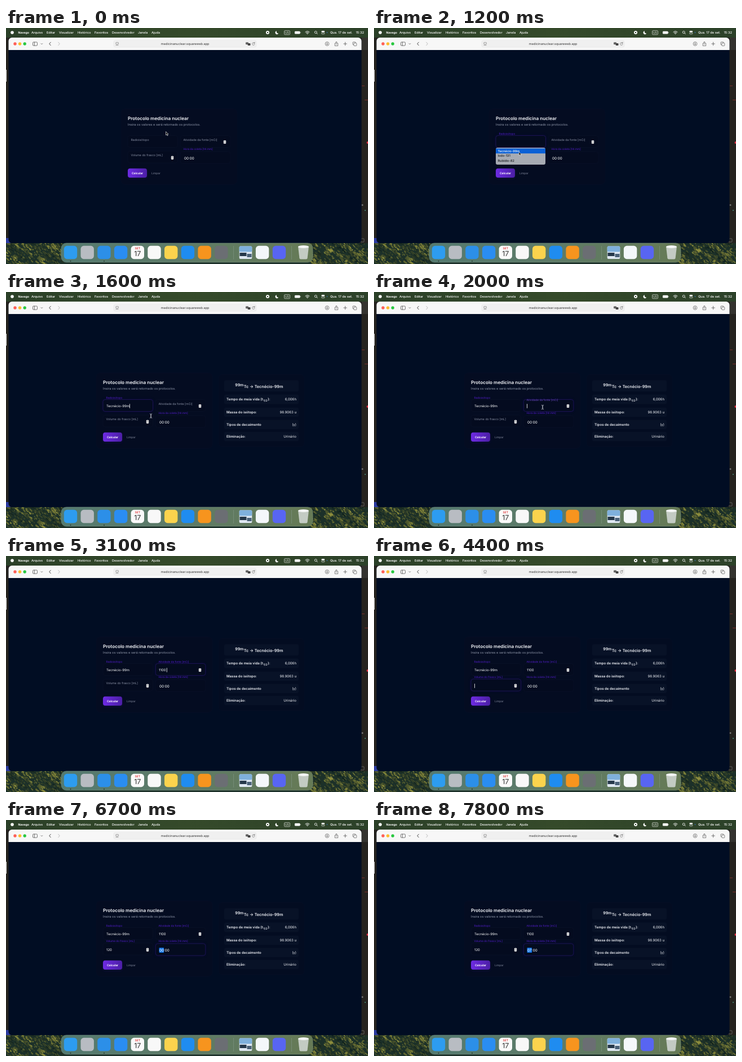
An HTML page for the animation above (8000 ms loop, 642 by 418 pixels).

```html
<!DOCTYPE html>
<html lang="pt-BR">
<head>
<meta charset="utf-8">
<title>Protocolo medicina nuclear</title>
<style>
  html, body { margin: 0; width: 100%; height: 100%; overflow: hidden; background: #1d2a1c; }
  svg { display: block; width: 642px; height: 418px; }
  text { font-family: Inter, Roboto, sans-serif; white-space: pre; text-rendering: geometricPrecision; }
</style>
</head>
<body>
<svg viewBox="0 0 642 418">
  <defs>
    <linearGradient id="button"><stop stop-color="#6d2be2"/><stop offset="1" stop-color="#4c1fa6"/></linearGradient>
    <linearGradient id="menubar"><stop stop-color="#2b4028"/><stop offset=".5" stop-color="#354a2a"/><stop offset="1" stop-color="#2c4129"/></linearGradient>
    <linearGradient id="dock"><stop stop-color="#547a70"/><stop offset=".5" stop-color="#5e7b67"/><stop offset="1" stop-color="#667a55"/></linearGradient>
    <filter id="glow" x="-20%" y="-50%" width="140%" height="200%"><feGaussianBlur stdDeviation="2"/></filter>
  </defs>
  <g id="desktop"></g>
  <g id="page"></g>
</svg>
<script>
const LOOP = 8000, STEP = 100;
const byId = id => document.getElementById(id);

// Drawing helpers; text is placed by its vertical centre.
const rect = (x, y, w, h, fill, r = 0, more = '') =>
  `<rect x="${x}" y="${y}" width="${w}" height="${h}" rx="${r}" fill="${fill}" ${more}/>`;
const circle = (x, y, r, fill, more = '') => `<circle cx="${x}" cy="${y}" r="${r}" fill="${fill}" ${more}/>`;
const line = (d, color = '#555', width = .8) =>
  `<path d="${d}" fill="none" stroke="${color}" stroke-width="${width}" stroke-linecap="round" stroke-linejoin="round"/>`;
const text = (x, y, str, size, fill = '#fff', weight = 400, anchor = 'start') =>
  `<text x="${x}" y="${y + size * .36}" font-size="${size}" fill="${fill}" font-weight="${weight}" text-anchor="${anchor}">${str}</text>`;

const easeOut = (t, start, span) => {
  const p = Math.min(1, Math.max(0, (t - start) / span));
  return 1 - (1 - p) ** 2;
};
const mix = (a, b, p) => a + (b - a) * p;
const mixColor = (a, b, p) => `rgb(${a.map((v, i) => Math.round(mix(v, b[i], p)))})`;

// Wooded slopes: short diagonal strokes, lit in broad bands.
function wallpaper() {
  let seed = 7;
  const random = () => (seed = seed * 16807 % 2147483647) / 2147483647;
  let out = rect(0, 378, 642, 40, '#1c3029');
  for (let i = 0; i < 700; i++) {
    const x = (i % 2 ? 540 : -2) + random() * 104, y = 380 + random() * 40;
    const band = .5 + .5 * Math.sin((x - y * 1.3) * .13);
    const light = Math.min(1, band * .45 + random() ** 2 * .6);
    const color = mixColor([14, 32, 30], [146, 146, 62], light);
    out += `<ellipse cx="${x.toFixed(1)}" cy="${y.toFixed(1)}" rx="${(1 + random() * 3).toFixed(1)}" ry="${(.6 + random()).toFixed(1)}" fill="${color}" transform="rotate(${Math.round(25 + random() * 35)} ${x.toFixed(1)} ${y.toFixed(1)})"/>`;
  }
  return out;
}

function menuBar() {
  const items = [['Arquivo', 45], ['Editar', 72], ['Visualizar', 94], ['Histórico', 127], ['Favoritos', 157],
    ['Desenvolvedor', 188], ['Janela', 234], ['Ajuda', 258]];
  return rect(0, 0, 642, 17, 'url(#menubar)') + circle(11, 8, 2.8, '#fff') +
    text(21.5, 8, 'Navego', 5.2, '#fff', 700) +
    items.map(([label, x]) => text(x, 8, label, 5.5, '#fff', 500)).join('') +
    circle(464, 8, 3, '#fff') + rect(462.9, 6.9, 2.2, 2.2, '#30452a', .4) +
    '<path d="M480 5.2a3 3 0 1 0 3.2 4.3a3 3 0 0 1-3.2-4.3z" fill="#fff"/>' +
    rect(493.5, 4.7, 10, 7, 'none', 1.3, 'stroke="#fff" stroke-width=".6"') + text(498.5, 8.2, 'US', 5, '#fff', 400, 'middle') +
    rect(512, 5.7, 9.5, 4.8, '#fff', 1.3) + rect(522, 7.2, .8, 1.8, '#ccc', .4) +
    line('M531 7.2q3.5-3 7 0M532.4 8.8q2.1-1.8 4.2 0', '#fff', 1) + circle(534.5, 10.3, .8, '#fff') +
    circle(549.3, 7.5, 2, 'none', 'stroke="#fff" stroke-width=".8"') + line('M550.8 9l1.6 1.7', '#fff') +
    rect(559.5, 5, 5.6, 2.4, '#fff', 1.2) + rect(559.5, 8.3, 5.6, 2.4, 'none', 1.2, 'stroke="#fff" stroke-width=".6"') +
    circle(569.5, 8, .8, '#3f7fe0') +
    text(575, 8, 'Qua. 17 de set.', 5.7, '#fff', 500) + text(635, 8, '15:32', 5.7, '#fff', 500, 'end');
}

function behindWindow() {
  return rect(0, 17, 642, 364, '#25231f') + rect(0, 74, 1, 21, '#eee') + rect(0, 372, 8, 9, '#2c3ba0') +
    rect(631, 17, 11, 22, '#34332f') + rect(631, 102, 5, 1, '#7a2f2a') + rect(636, 127, 6, 1, '#7a2f2a') +
    circle(641.5, 203, 2, '#e03246') + circle(632, 313.5, 1.5, '#777') + circle(637, 323, .9, '#4fa08a') +
    rect(629, 373, 6, 6, 'none', 1, 'stroke="#777" stroke-width=".7"');
}

function browser() {
  const lights = ['#ff5f57', '#febc2e', '#28c840'].map((c, i) => circle(16 + i * 8.6, 28, 2.7, c)).join('');
  return rect(4.5, 17, 626, 364, '#010d23', 6) +
    '<path d="M4.5 39V23a6 6 0 0 1 6-6H624.5a6 6 0 0 1 6 6V39z" fill="#f7f7f7"/>' + lights +
    rect(47.5, 25, 8, 6.2, 'none', 1.3, 'stroke="#555" stroke-width=".8"') + line('M50.3 25v6') +
    line('M62 27.5l1.4 1.4l1.4-1.4') + line('M79.3 25.2l-2.6 2.8l2.6 2.8', '#444', 1) + line('M92.7 25.2l2.6 2.8l-2.6 2.8', '#bbb', 1) +
    rect(191, 22, 253, 12, '#f0f0f0', 3, 'stroke="#e2e2e2" stroke-width=".5"') +
    rect(194.8, 25.5, 4.6, 3.2, 'none', .7, 'stroke="#666" stroke-width=".6"') + line('M195 30.5h4', '#666', .6) +
    text(317.7, 28, 'medicinanuclear.squareweb.app', 5.6, '#333', 400, 'middle') +
    rect(425, 25.3, 5, 4, '#666', 1) + rect(428.7, 27, 4.8, 4, '#444', 1) +
    line('M440.8 26.8a2.3 2.3 0 1 0 .3 2M441 25.2v1.8h-1.8', '#666', .7) +
    circle(569.5, 28, 3.4, 'none', 'stroke="#555" stroke-width=".7"') + line('M569.5 26v3.5m-1.4-1.3l1.4 1.4l1.4-1.4', '#555', .7) +
    line('M584.5 27h-1.3v4.6h5.4v-4.6h-1.3M585.9 29.2v-4.8m-1.4 1.3l1.4-1.4l1.4 1.4', '#555', .7) +
    line('M598.8 28h5.6M601.6 25.2v5.6', '#555', .8) +
    rect(615, 24.8, 5, 5, 'none', 1, 'stroke="#555" stroke-width=".7"') + rect(616.8, 26.6, 5, 5, '#f7f7f7', 1, 'stroke="#555" stroke-width=".7"');
}

function dock() {
  const colors = ['#2d9cf0', '#b8bcc2', '#2c8fe8', '#2a8df2', '#fafafa', '#f8f8f8', '#fbd34d', '#1f8cf0', '#f7941e', '#6b6e73'];
  const icon = (x, color) => rect(x - 11.7, 385.8, 23.4, 23.4, color, 5.4);
  return rect(98, 381, 446, 34, 'url(#dock)', 9, 'stroke="#7c9485" stroke-width=".5"') +
    colors.map((c, i) => icon(114.5 + i * 29.7, c)).join('') +
    text(233.3, 389.8, 'SET', 5, '#e0383a', 600, 'middle') + text(233.3, 399.8, '17', 12.5, '#333', 400, 'middle') +
    rect(403, 386, .7, 24, '#7f9382') + rect(506, 386, .7, 24, '#7f9382') +
    rect(413.7, 386.5, 22.6, 22.5, '#dfe8f2', 2) + rect(413.7, 386.5, 22.6, 10, '#7fb0dc', 2) +
    rect(414.5, 398, 12, 6, '#26384a') + rect(427.5, 400, 8, 6, '#4a6178') +
    icon(454.6, '#f4f7fa') + icon(484.5, '#5865f2') +
    '<path d="M518 387h19l-2.4 20.5q-.3 2-2.3 2h-9.6q-2 0-2.3-2z" fill="#d3d9d6" opacity=".85"/>' +
    '<ellipse cx="527.5" cy="387.5" rx="9.5" ry="2.6" fill="#f3f5f4"/>' +
    circle(114.5, 412.8, .9, '#1a261e') + circle(174, 412.8, .9, '#1a261e');
}

byId('desktop').innerHTML = wallpaper() + behindWindow() + menuBar() + browser() + dock();

const PURPLE = [86, 30, 208], MUTED = [139, 146, 166];

function floatingLabel(x, restY, floatY, label, amount) {
  return text(x, mix(restY, floatY, amount), label, mix(5.25, 4.7, amount), mixColor(MUTED, PURPLE, amount));
}

function inputBox(x, y, focused) {
  const outline = focused ? 'stroke="#1b1556" stroke-width=".9"' : 'stroke="#0b1229" stroke-width=".7"';
  const glow = focused ? rect(x - .5, y - .5, 89, 22, '#150f4a', 4, 'filter="url(#glow)" opacity=".5"') : '';
  return glow + rect(x, y, 88.5, 21, '#040b1f', 4, outline);
}

const stepper = (x, y) => rect(x - 2.2, y - 3.1, 4.4, 6.2, '#f2f2f4', 1.3) +
  line(`M${x - 1} ${y - .8}l1-1l1 1M${x - 1} ${y + .8}l1 1l1-1`, '#222', .6);
const caret = (x, y, opacity = 1) => rect(x, y - 3.8, .8, 7.6, '#fff', 0, `opacity="${opacity}"`);

// Last value whose start time has been reached.
const at = (t, stages) => stages.filter(([start]) => t >= start).pop()[1];

function form(t, left) {
  const focus = at(t, [[0, ''], [800, 'isotope'], [1900, 'activity'], [3400, 'volume'], [6700, 'time']]);
  const isotope = at(t, [[0, ''], [1300, 'Tecnécio-99m']]);
  const activity = at(t, [[0, ''], [2600, '1'], [2700, '11'], [2900, '110'], [3000, '1100']]);
  const volume = at(t, [[0, ''], [4900, '1'], [6400, '12'], [6600, '120']]);
  const blink = at(t, [[0, 1], [4000, .5], [4100, 0], [4300, .5], [4400, 1]]);
  const carets = {
    isotope: isotope && caret(46.9, 202),
    activity: caret(99.2 + activity.length * 3.4, 202),
    volume: caret(6.2 + volume.length * 3.2, 230, blink),
  };
  return `<g transform="translate(${left})">` +
    rect(-12, 143, 206, 134, '#040c21', 7, 'stroke="#061027" stroke-width=".7"') +
    text(0, 160, 'Protocolo medicina nuclear', 8.2, '#f5f6fa', 600) +
    text(0, 170.8, 'Insira os valores e será retornado os protocolos.', 5.66, '#929aad') +
    inputBox(0, 190.5, focus === 'isotope') + inputBox(93.3, 190.5, focus === 'activity') +
    inputBox(0, 218, focus === 'volume') + inputBox(93.3, 219, focus === 'time') +
    floatingLabel(5.4, 197.8, 187, 'Radioisótopo', easeOut(t, 800, 250)) +
    floatingLabel(98.6, 197.8, 187, 'Atividade da fonte [mCi]', easeOut(t, 1900, 250)) +
    floatingLabel(5.4, 225.2, 214.5, 'Volume do frasco [mL]', easeOut(t, 3400, 250)) +
    floatingLabel(98.6, 225.2, 214.5, 'Hora da coleta [hh:mm]', 1) +
    text(6, 202.3, isotope, 5.95) + text(99, 202.3, activity, 6) + text(6, 230, volume, 6) +
    (focus === 'time' ? rect(99.5, 226.2, 8.6, 8.8, '#1676e6', 1) : '') +
    text(100, 230.8, at(t, [[0, '00'], [7800, '07']]), 6.3) + text(107.9, 230.8, ':00', 6.3) +
    stepper(172, 202) + stepper(79, 229.8) + (carets[focus] || '') +
    rect(0, 250.5, 34, 16, '#31148a', 4, 'filter="url(#glow)" opacity=".25"') +
    rect(0, 248.7, 34, 16.2, 'url(#button)', 4) + text(17, 256.8, 'Calcular', 4.95, '#fff', 700, 'middle') +
    text(42, 256.8, 'Limpar', 4.85, '#858ca0') + '</g>';
}

function isotopePanel(left, opacity) {
  const rows = [['Massa do isótopo:', '98.9063 u', 213], ['Tipos de decaimento', '(γ)', 234.8], ['Eliminação:', 'Urinário', 256]];
  const bar = (y, h) => rect(0, y - h / 2, 132, h, '#081227', 3);
  return `<g transform="translate(${left})" opacity="${opacity}">` +
    rect(-10, 146, 152, 128, '#030c21', 6, 'stroke="#061027" stroke-width=".7"') +
    bar(166.3, 20) + text(19.3, 165, '99m', 6.9, '#f0f2f7', 600) + text(34.8, 167.6, 'Tc → Tecnécio-99m', 7.2, '#f0f2f7', 600) +
    bar(190, 17) + text(4, 190, 'Tempo de meia vida (t', 6.1, '#f0f2f7', 600) +
    text(69.5, 191.8, '1/2', 4.9, '#f0f2f7', 600) + text(81.5, 190, '):', 6.1, '#f0f2f7', 600, 'end') +
    text(128, 190, '6,006h', 6.1, '#f0f2f7', 400, 'end') +
    rows.map(([name, value, y]) => bar(y, 16.5) + text(4, y, name, 6.1, '#f0f2f7', 600) +
      text(128, y, value, 6.1, '#f0f2f7', 400, 'end')).join('') + '</g>';
}

function isotopeMenu(selected) {
  return rect(216, 212, 88, 30, '#a7abb3', 3) + (selected >= 0 ? rect(216, 213.4, 88, 8.8, '#0a60d6') : '') +
    ['Tecnécio-99m', 'Iodo-131', 'Rubídio-82'].map((name, i) =>
      text(219.5, 217.8 + i * 8.7, name, 5.55, i === selected ? '#fff' : '#15171c', 500)).join('');
}

function suggestions(values) {
  return rect(169, 239, 26, 6.8 + values.length * 9.6, '#b3b4c3', 3.5) +
    values.map((value, i) => text(175, 247 + i * 9.65, value, 5.6, '#1c1c28', 500)).join('');
}

function pointer(t) {
  if (t >= 2600) return '';
  const firstMove = easeOut(t, 500, 200), secondMove = easeOut(t, 1000, 200), thirdMove = easeOut(t, 1700, 300);
  const x = mix(mix(mix(283.5, 262, firstMove), 257, secondMove), 299, thirdMove);
  const y = mix(mix(mix(183.5, 200, firstMove), 219.5, secondMove), 204, thirdMove);
  if (t >= 1400) return line(`M${x - 1.7} ${y - 3.7}q1.7 0 1.7 1.2v5q0 1.2-1.7 1.2M${x + 1.7} ${y - 3.7}q-1.7 0-1.7 1.2v5q0 1.2 1.7 1.2`, '#c9ccd4', .8);
  return `<path transform="translate(${x} ${y})" d="M0 0v6.2l1.5-1.4l1.1 2.5l1.1-.5l-1.1-2.4h2z" fill="#111" stroke="#fff" stroke-width=".6"/>`;
}

function draw(t) {
  const shift = easeOut(t, 1300, 250);
  let scene = form(t, mix(216, 172, shift));
  if (shift > 0) scene += isotopePanel(387 + 44 * (1 - shift), easeOut(t, 1300, 220));
  if (t >= 1000 && t < 1300) scene += isotopeMenu(t >= 1100 ? 0 : -1);
  if (t >= 5400 && t < 6600) scene += suggestions(t < 6400 ? [10, 110, 120, 100, 15, 150, 1000] : [120]);
  byId('page').innerHTML = scene + pointer(t);
}

let drawn = -1;
function tick() {
  const t = Math.floor(performance.now() % LOOP / STEP) * STEP;
  if (t !== drawn) draw(drawn = t);
  requestAnimationFrame(tick);
}
tick();
</script>
</body>
</html>
```
